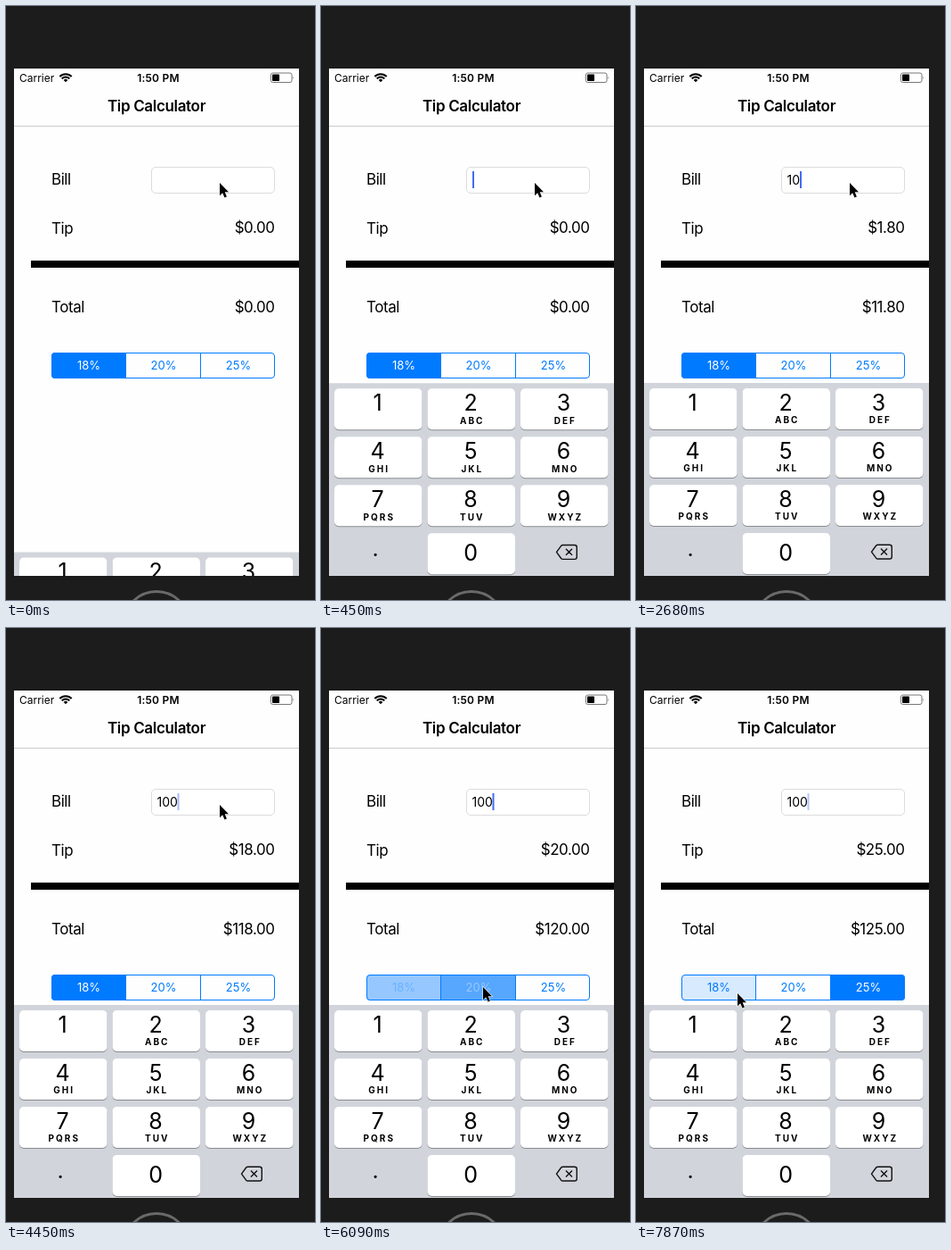
These frames come from a looping animation (347 px wide and 665 px high, 8 s). An HTML page:

```html
<!DOCTYPE html>
<html lang="en">
<head>
<meta charset="utf-8">
<title>Tip Calculator</title>
<style>
  html, body { margin: 0; height: 100%; overflow: hidden; background: #1c1c1c; }
  svg { display: block; width: 100%; height: 100%; font-family: Inter, Roboto, sans-serif; }
  .label { font-size: 17px; letter-spacing: -.45px; }
  .end { text-anchor: end; }
  .mid { text-anchor: middle; }
  .digit { font-size: 25px; }
  .letters { font-size: 10px; font-weight: 700; letter-spacing: 2px; }
  .seg { font-size: 13px; }
</style>
</head>
<body>
<svg viewBox="0 0 347 665">
  <clipPath id="screen"><path d="M9 70h320v568H9z"/></clipPath>
  <clipPath id="pill"><rect x="51" y="388" width="251" height="29" rx="4"/></clipPath>
  <circle cx="169" cy="692.5" r="37" fill="none" stroke="#6a6a6a" stroke-width="3"/>
  <g clip-path="url(#screen)">
    <path d="M9 70h320v568H9z" fill="#fefefe"/>

    <text x="15" y="84.5" font-size="12">Carrier</text>
    <g fill="none" stroke="#000" stroke-width="2">
      <path d="M60.3 79A9.4 9.4 0 0 1 73.7 79M62.7 81.4A6 6 0 0 1 71.3 81.4"/>
      <path d="M67 85.3l-2.3-2.4a3.2 3.2 0 0 1 4.6 0z" fill="#000" stroke="none"/>
    </g>
    <text class="mid" x="171" y="84.5" font-size="12" font-weight="600" letter-spacing=".25">1:50 PM</text>
    <rect x="297.5" y="75" width="23.5" height="10.5" rx="2" fill="none" stroke="#777"/>
    <rect x="299" y="76.5" width="8" height="7.5" rx=".8"/>
    <path d="M322 78.5q1.5 1.7 0 3.6z" fill="#777"/>
    <text class="mid" x="169" y="118" font-size="17" font-weight="600" letter-spacing="-.33">Tip Calculator</text>
    <path d="M9 134.5h320" stroke="#cbcbcb"/>

    <g class="label">
      <text x="51" y="199.5">Bill</text>
      <text x="51" y="254.5">Tip</text>
      <text x="51" y="342.5">Total</text>
      <text class="end" id="tip" x="301.5" y="253.5"/>
      <text class="end" id="total" x="301.5" y="342.5"/>
    </g>
    <rect x="163.5" y="180.5" width="138" height="29" rx="4.5" fill="#fff" stroke="#dcdcdc"/>
    <text id="bill" x="169.5" y="200" font-size="14"/>
    <rect id="caret" y="185" width="2" height="19" fill="#426bf2"/>
    <path d="M28 285h301v8H28z"/>

    <g id="segments" clip-path="url(#pill)"/>
    <rect x="51.5" y="388.5" width="250" height="28" rx="3.5" fill="none" stroke="#007aff"/>
    <path d="M134.5 388v29M218.5 388v29" stroke="#007aff"/>

    <g id="keyboard">
      <path d="M9 422h320v216H9z" fill="#d1d5db"/>
      <g id="keys"/>
      <text class="mid digit" x="61" y="616">.</text>
      <path d="M271.5 603.2h13.2q2.6 0 2.6 2.6v10.6q0 2.6-2.6 2.6h-13.2q-1 0-1.8-.8l-5.2-7.1 5.2-7.1q.8-.8 1.8-.8zM275 607.5l7 7m0-7l-7 7"
            fill="none" stroke="#111" stroke-width="1.4" stroke-linejoin="round"/>
    </g>
  </g>
  <path id="cursor" d="M0 0V14.2L3.2 11.2L5.5 16.4L7.9 15.4L5.7 10.3H10Z" stroke="#fff" stroke-width="1.1" paint-order="stroke"/>
</svg>
<script>
const $ = id => document.getElementById(id);
const clamp = v => Math.max(0, Math.min(1, v));
const ramp = (t, from, to) => clamp((t - from) / (to - from));
const smooth = p => p * p * (3 - 2 * p);

const LOOP = 8000, TICK = 148.5;
const RATES = [18, 20, 25];
const PICKED = [0, 6000, 6900];                             // when each rate is chosen
const PRESSED = [[7800, 8000], [5950, 6150], [6750, 7050]]; // finger-down highlight
const TYPED = [2370, 2670, 2965];                           // key strokes of "100"
const CARET_X = [170, 175.5, 184, 192.5];
const MOVES = [[4800, 5900, 182, 402], [6200, 6700, 249, 400], [7300, 7800, 114, 409]];

const LETTERS = ["", "ABC", "DEF", "GHI", "JKL", "MNO", "PQRS", "TUV", "WXYZ"];
function key(digit, col, row) {
  const x = 15 + col * 104.5, y = 428 + row * 54, mid = x + 49.25;
  const box = (dy, fill) => `<rect x="${x}" y="${y + dy}" width="98.5" height="46" rx="5" fill="${fill}"/>`;
  return box(1, "#898b8f") + box(0, "#fff") +
    `<text class="mid digit" x="${mid - .7}" y="${y + (digit ? 25 : 31)}">${digit}</text>` +
    `<text class="mid letters" x="${mid + 1}" y="${y + 39.3}">${LETTERS[digit - 1] || ""}</text>`;
}
$("keys").innerHTML = LETTERS.map((_, i) => key(i + 1, i % 3, Math.floor(i / 3))).join("") + key(0, 1, 3);

$("segments").innerHTML = RATES.map((rate, i) =>
  `<rect x="${51 + i * 83.7}" y="388" width="83.7" height="29" fill="#007aff"/>` +
  `<text class="mid seg" x="${93 + i * 84}" y="407.3">${rate}%</text>`).join("");
const fills = document.querySelectorAll("#segments rect");
const names = document.querySelectorAll("#segments text");

// Critically damped spring, already a little under way at time 0
function keyboardOffset(t) {
  const w = (t + 33) * .01826;
  return 216 * (1 + w) * Math.exp(-w);
}

function caretOpacity(t) {
  if (t < 140) return 0;
  if (t > 2220 && t < 2960) return 1;
  const p = (t + (t < 2220 ? 620 : 0)) % 1000;
  return p < 700 ? 1 - ramp(p, 380, 520) : ramp(p, 862, 884);
}

function cursorAt(t) {
  let x = 240, y = 198;
  for (const [from, to, toX, toY] of MOVES) {
    const p = smooth(ramp(t, from, to));
    x += (toX - x) * p;
    y += (toY - y) * p;
  }
  return [x, y];
}

function draw(t) {
  $("keyboard").setAttribute("transform", `translate(0 ${keyboardOffset(t)})`);

  const count = TYPED.filter(at => t >= at).length;
  const bill = "100".slice(0, count);
  const rate = RATES[PICKED.filter(at => t >= at).length - 1];
  const tip = bill * rate / 100;
  $("bill").textContent = bill;
  $("tip").textContent = "$" + tip.toFixed(2);
  $("total").textContent = "$" + (+bill + tip).toFixed(2);
  $("caret").setAttribute("x", CARET_X[count]);
  $("caret").setAttribute("opacity", caretOpacity(t));

  const shown = PICKED.map((at, i) => i ? ramp(t, at, at + 150) : 1);
  RATES.forEach((_, i) => {
    const level = shown[i] - (shown[i + 1] || 0);
    const [down, up] = PRESSED[i];
    const press = t >= down && t < up ? .15 : 0;
    fills[i].setAttribute("opacity", level + (1 - level) * press);
    names[i].setAttribute("fill", `rgb(${255 * level},${122 + 133 * level},255)`);
  });

  $("cursor").setAttribute("transform", `translate(${cursorAt(t)})`);
}

function frame() {
  const t = performance.now() % LOOP;
  draw(Math.floor((t + 9) / TICK) * TICK);
  requestAnimationFrame(frame);
}
frame();
</script>
</body>
</html>
```
